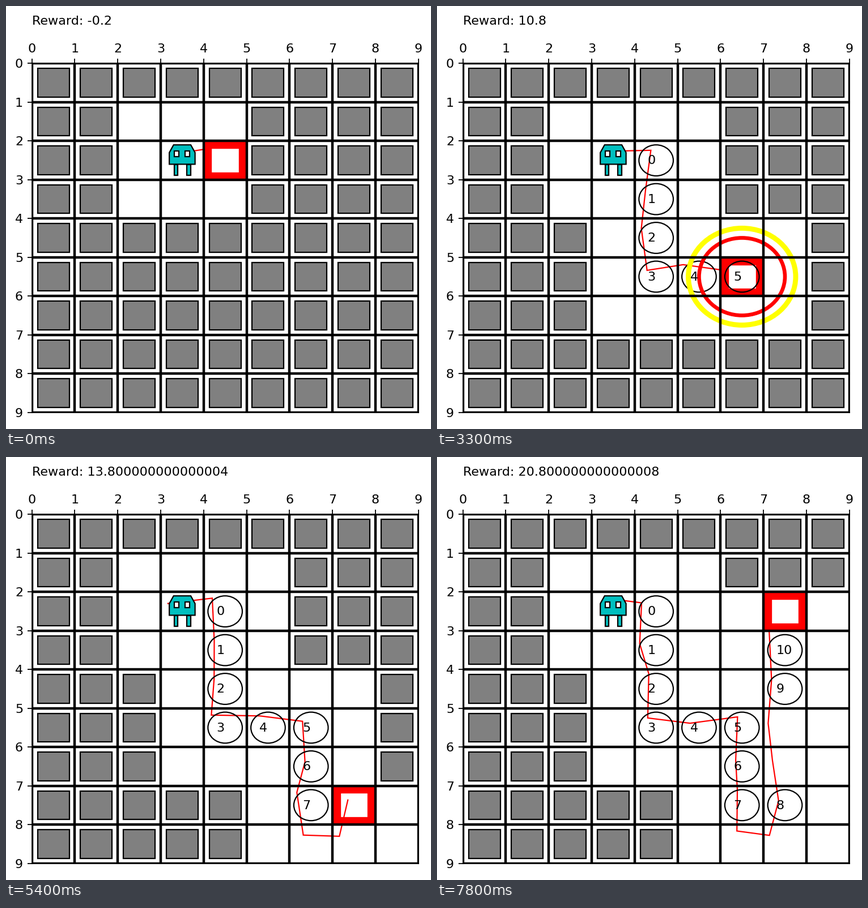
Write a matplotlib script that moves like this. It is 750 px wide and 747 px high and loops after 8 s.

```python
import random

import matplotlib.pyplot as plt
from matplotlib.animation import FuncAnimation
from matplotlib.patches import Ellipse, PathPatch, Polygon, Rectangle
from matplotlib.path import Path

W, H, DPI = 750, 747, 160
LEFT, TOP, WIDTH, HEIGHT = 45.68, 101.5, 682, 616
SIZE = 9
START = (3, 2)
MOVES = {"R": (1, 0), "L": (-1, 0), "D": (0, 1), "U": (0, -1)}
ACTIONS = "R*D*D*D*R*R*D*D*DRU*UUU*U*U"  # "*" drops a beacon
TICKS_PER_STEP = 3
STEP_COST, BEACON_GAIN, FAR_BEACON_GAIN = 0.2, 2, 4


def around(cell):
    x, y = cell
    return {(x + i, y + j) for i in (-1, 0, 1) for j in (-1, 0, 1)}


def wobbly(step, route):
    """Shift every point of the route anew inside the top left of its cell."""
    rng = random.Random(step)
    return [(x + rng.uniform(0.1, 0.4), y + rng.uniform(0.1, 0.4)) for x, y in route]


def simulate():
    route, beacons, seen, reward, steps = [START], [], around(START), 0, []
    for number, action in enumerate(ACTIONS):
        seen = seen | around(route[-1])
        x, y = route[-1]
        if action == "*":
            last_x, last_y = beacons[-1] if beacons else START
            far = abs(last_x - x) + abs(last_y - y) > 2
            reward += FAR_BEACON_GAIN if far else BEACON_GAIN
            beacons.append((x, y))
        else:
            dx, dy = MOVES[action]
            route.append((x + dx, y + dy))
            reward -= STEP_COST
        steps.append(dict(cell=route[-1], line=wobbly(number, route), seen=seen,
                          beacons=len(beacons), ring=action == "*", reward=reward))
    return steps, beacons


STEPS, BEACONS = simulate()

plt.rcParams.update({"font.family": "DejaVu Sans", "font.size": 10})
fig = plt.figure(figsize=(W / DPI, H / DPI), dpi=DPI, facecolor="white")
ax = fig.add_axes([LEFT / W, 1 - (TOP + HEIGHT) / H, WIDTH / W, HEIGHT / H])
ax.set_xlim(0, SIZE)
ax.set_ylim(SIZE, 0)
ax.set_xticks(range(SIZE + 1))
ax.set_yticks(range(SIZE + 1))
ax.xaxis.tick_top()
ax.grid(color="black", linewidth=2)


def ring(cell, radius, color, width):
    x, y = cell
    return ax.add_patch(Ellipse((x + 0.5, y + 0.5), 2 * radius, 2 * radius,
                                fill=False, edgecolor=color, linewidth=width))


def box(x, y, w, h, face):
    return ax.add_patch(Rectangle((x, y), w, h, facecolor=face,
                                  edgecolor="black", linewidth=1))


def draw_robot(x, y):
    outline = [(0.2, 0.6), (0.2, 0.3), (0.3, 0.1), (0.7, 0.1), (0.8, 0.3), (0.8, 0.6)]
    ax.add_patch(Polygon([(x + u, y + v) for u, v in outline], closed=True,
                         facecolor="c", edgecolor="black", linewidth=1))
    for eye in (0.32, 0.57):
        box(x + eye, y + 0.26, 0.1, 0.14, "white")
    for leg in (0.31, 0.61):
        box(x + leg, y + 0.61, 0.09, 0.28, "c")


fog = {(x, y): box(x + 0.13, y + 0.13, 0.74, 0.74, "gray")
       for x in range(SIZE) for y in range(SIZE)}
trail = ax.add_patch(PathPatch(Path([START, START]), fill=False,
                               edgecolor="red", linewidth=1))
draw_robot(*START)
marker = ax.add_patch(Rectangle(START, 0.8, 0.8, fill=False,
                                edgecolor="red", linewidth=6))
beacon_art = [(ring((x, y), 0.4, "black", 1), ax.text(x + 0.3, y + 0.6, str(n)))
              for n, (x, y) in enumerate(BEACONS)]
signals = [ring(START, 1, "red", 3), ring(START, 1.25, "yellow", 4)]
score = ax.text(0, -1, "")


def update(tick):
    step = STEPS[tick // TICKS_PER_STEP]
    x, y = step["cell"]
    for cell, patch in fog.items():
        patch.set_visible(cell not in step["seen"])
    trail.set_path(Path(step["line"]))
    marker.set_xy((x + 0.1, y + 0.1))
    for signal in signals:
        signal.set_center((x + 0.5, y + 0.5))
        signal.set_visible(step["ring"])
    for n, art in enumerate(beacon_art):
        for artist in art:
            artist.set_visible(n < step["beacons"])
    score.set_text(f"Reward: {step['reward']}")
    return []


anim = FuncAnimation(fig, update, frames=80, interval=100, repeat=True,
                     repeat_delay=0, blit=False)
plt.show()
```
